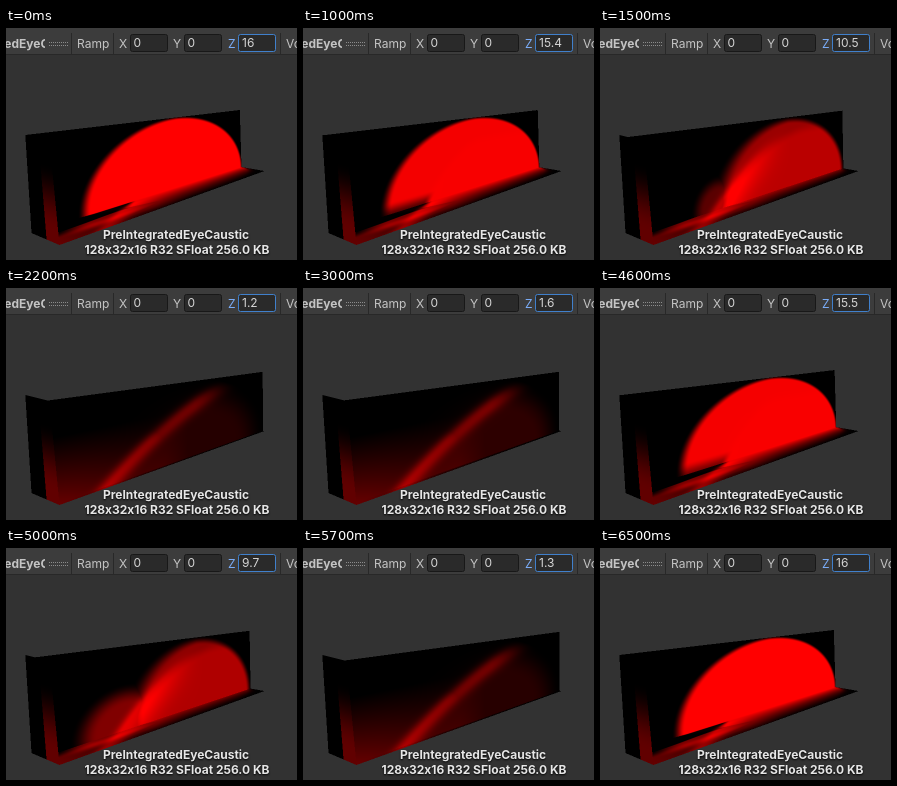
Write an HTML page with a canvas that moves like this. It is 291 px wide and 232 px high and loops after 7.2 s.

```html
<!DOCTYPE html>
<html lang="en">
<head>
<meta charset="utf-8">
<title>Volume slice preview</title>
<style>
html, body { margin: 0; width: 100%; height: 100%; overflow: hidden; background: #323232; }
canvas, svg { position: absolute; left: 0; top: 0; width: 291px; height: 232px; }
text { font: 12px Inter, "Liberation Sans", sans-serif; fill: #c4c4c4; }
.bold { font-weight: 700; }
.label { font-weight: 700; fill: #e6e6e6; text-anchor: middle; text-shadow: 0 1px 2px #000; }
.field { fill: #2a2a2a; stroke: #181818; }
.value { fill: #d6d6d6; }
</style>
</head>
<body>
<canvas id="view" width="291" height="232"></canvas>
<svg viewBox="0 0 291 232">
  <clipPath id="tab"><path d="M0 0H39V27H0Z"/></clipPath>
  <path d="M0 0H291V26H0Z" fill="#3c3c3c"/>
  <path d="M0 26.5H291M65.5 5V26M107.5 5V26M274.5 5V26" stroke="#282828"/>
  <path d="M43 14.5H63M43 17.5H63" stroke="#8c8c8c" stroke-dasharray="1 1"/>
  <text class="bold" x="-6" y="20" clip-path="url(#tab)">tedEyeC</text>
  <text x="71" y="20">Ramp</text>
  <text x="113" y="20">X</text>
  <text x="167" y="20">Y</text>
  <text x="222" y="20" style="fill:#7baefa">Z</text>
  <text x="280" y="20">Vo</text>
  <rect class="field" x="124.5" y="6.5" width="37" height="17" rx="2"/>
  <rect class="field" x="178.5" y="6.5" width="37" height="17" rx="2"/>
  <rect class="field" x="232.5" y="6.5" width="37" height="17" rx="2" style="stroke:#4080cc"/>
  <text class="value" x="127.5" y="19">0</text>
  <text class="value" x="181.5" y="19">0</text>
  <text class="value" x="236" y="19" id="z">16</text>
  <text class="label" x="170" y="211">PreIntegratedEyeCaustic</text>
  <text class="label" x="171" y="226">128x32x16 R32 SFloat 256.0 KB</text>
</svg>
<script>
const LOOP = 7200, STEP = 100;
// Drags of the Z field: first step, then one value per step
const drags = [
  [9, [15.8, 15.4, 14.7, 13.8, 12.8, 11.7, 10.5, 8.8, 7.2, 5.8, 4.4, 3.2, 2.1, 1.2, 0.6, 0.2, 0]],
  [30, [1.6, 2.3, 3.2, 4.4, 5.7, 7.2, 8.8, 10.6, 12.5, 14, 15, 15.7, 16]],
  [46, [15.5, 14.5, 13, 11.4, 9.7, 8.2, 6.9, 5.8, 4.3, 2.9, 1.9, 1.3, 1, 1.6, 3.1, 5.6, 9, 12.4, 15, 16]]
];
// Box corners on screen: [front, back]
const topL = [[43.5, 113], [19.3, 107]], topR = [[258.6, 84], [233.8, 82]];
const botL = [[53.5, 217], [25.5, 205]], botR = [[258.5, 143], [235.5, 139]];

// Part of the stage that holds the box, drawn at double size
const X0 = 16, Y0 = 78, W = 246, H = 144, SCALE = 2;
const buf = document.createElement("canvas");
buf.width = W * SCALE;
buf.height = H * SCALE;
const bufCtx = buf.getContext("2d");
const view = document.getElementById("view").getContext("2d");
const zText = document.getElementById("z");

const clamp = x => Math.max(0, Math.min(1, x));
const mix = (a, b, k) => a + (b - a) * k;
const smooth = (a, b, x) => { const k = clamp((x - a) / (b - a)); return k * k * (3 - 2 * k); };
const along = ([a, b], t) => [mix(a[0], b[0], t), mix(a[1], b[1], t)];

function zAt(step) {
  let z = 16;
  for (const [start, values] of drags)
    if (step >= start) z = values[Math.min(step - start, values.length - 1)];
  return z;
}

// Light in the volume: u to the right, v up, t to the back
function light(u, v, t) {
  // main dome, softer on its left
  const left = mix(0.08, 0.15 + 0.29 * (1 - t), smooth(0.15, 0.55, t));
  const r = (1 - left) / 2, x = (u - 1 + r) / r;
  const soft = (0.04 + 0.5 * (1 - t) ** 2) * (1 + 1.5 * clamp(-x));
  const dome = 1 - smooth(1.01 - soft, 1.02, Math.hypot(x, v / 0.99));

  // low lobe that grows to the left
  const grow = clamp((0.69 - t) * 9);
  const lobe = 1 - smooth(0.6, 1.1, Math.hypot((u - 0.28) / mix(0.04, 0.23, grow), v / mix(0.3, 0.58, grow)));
  const lobeLight = 0.5 * lobe * smooth(0.72, 0.62, t) * smooth(0.1, 0.45, t);

  // bright fold, sharp above and wide below
  const k = (t - 0.1) / 0.5, m = mix(1, 0.78, k), reach = mix(0.95, 0.68, k);
  const crest = mix(1, 0.83, k) * (1 - (Math.max(0, m - u) / mix(0.84, 0.52, k)) ** 2);
  const below = crest - v;
  const fold = 0.4 * (1 - smooth(0.8, 1, t)) * (1 - smooth(reach - 0.4, reach, u))
    * Math.exp(-((below / (below > 0 ? mix(0.13, 0.35, clamp(k)) : 0.1)) ** 2));

  const outer = t ** 1.2 * mix(smooth(-0.02, 0.14, v), 1, smooth(0.94, 1, t));
  const body = mix(outer, t ** 0.75, smooth(-0.08, 0.1, below));
  const glow = 0.4 * (1 - smooth(0.3, 0.6, t)) * clamp(1 - v / 0.65) * clamp(1 - 2 * u);
  return Math.max(body * dome, lobeLight) + fold * Math.sqrt(Math.max(dome, lobe)) + glow;
}

// Fills a quad in perspective; corners run (0,0) (1,0) (1,1) (0,1)
function fillQuad(img, [[x0, y0], [x1, y1], [x2, y2], [x3, y3]], shade) {
  const sx = x0 - x1 + x2 - x3, sy = y0 - y1 + y2 - y3;
  const ax = x1 - x2, ay = y1 - y2, bx = x3 - x2, by = y3 - y2;
  const den = ax * by - bx * ay;
  const g = (sx * by - bx * sy) / den, h = (ax * sy - sx * ay) / den;
  const a = x1 - x0 + g * x1, b = x3 - x0 + h * x3;
  const d = y1 - y0 + g * y1, e = y3 - y0 + h * y3;
  for (let j = 0; j < img.height; j++) {
    for (let i = 0; i < img.width; i++) {
      const x = X0 + (i + 0.5) / SCALE, y = Y0 + (j + 0.5) / SCALE;
      const p = a - g * x, q = b - h * x, r = d - g * y, s = e - h * y;
      const det = p * s - q * r;
      const u = ((x - x0) * s - q * (y - y0)) / det;
      const v = (p * (y - y0) - r * (x - x0)) / det;
      if (u < 0 || u > 1 || v < 0 || v > 1) continue;
      const o = (j * img.width + i) * 4;
      img.data[o] = 255 * clamp(shade(u, v));
      img.data[o + 3] = 255;
    }
  }
}

function draw(z) {
  const t = z / 16, img = bufCtx.createImageData(buf.width, buf.height);
  fillQuad(img, [botL[0], botR[0], botR[1], botL[1]], (u, v) => light(u, 0, v) * mix(1, v, u));
  fillQuad(img, [botL, botR, topR, topL].map(edge => along(edge, t)), (u, v) => light(u, v, t));
  fillQuad(img, [botL[0], botL[1], topL[1], topL[0]],
    (u, v) => u < 0.45 ? 0.38 * (1 - smooth(0.1, 0.75, v)) : 0);
  bufCtx.putImageData(img, 0, 0);
  view.clearRect(0, 0, 291, 232);
  view.drawImage(buf, X0, Y0, W, H);
  zText.textContent = z;
}

let shown;
function tick() {
  const z = zAt(Math.floor(performance.now() % LOOP / STEP));
  if (z !== shown) draw(shown = z);
  requestAnimationFrame(tick);
}
tick();
</script>
</body>
</html>
```
